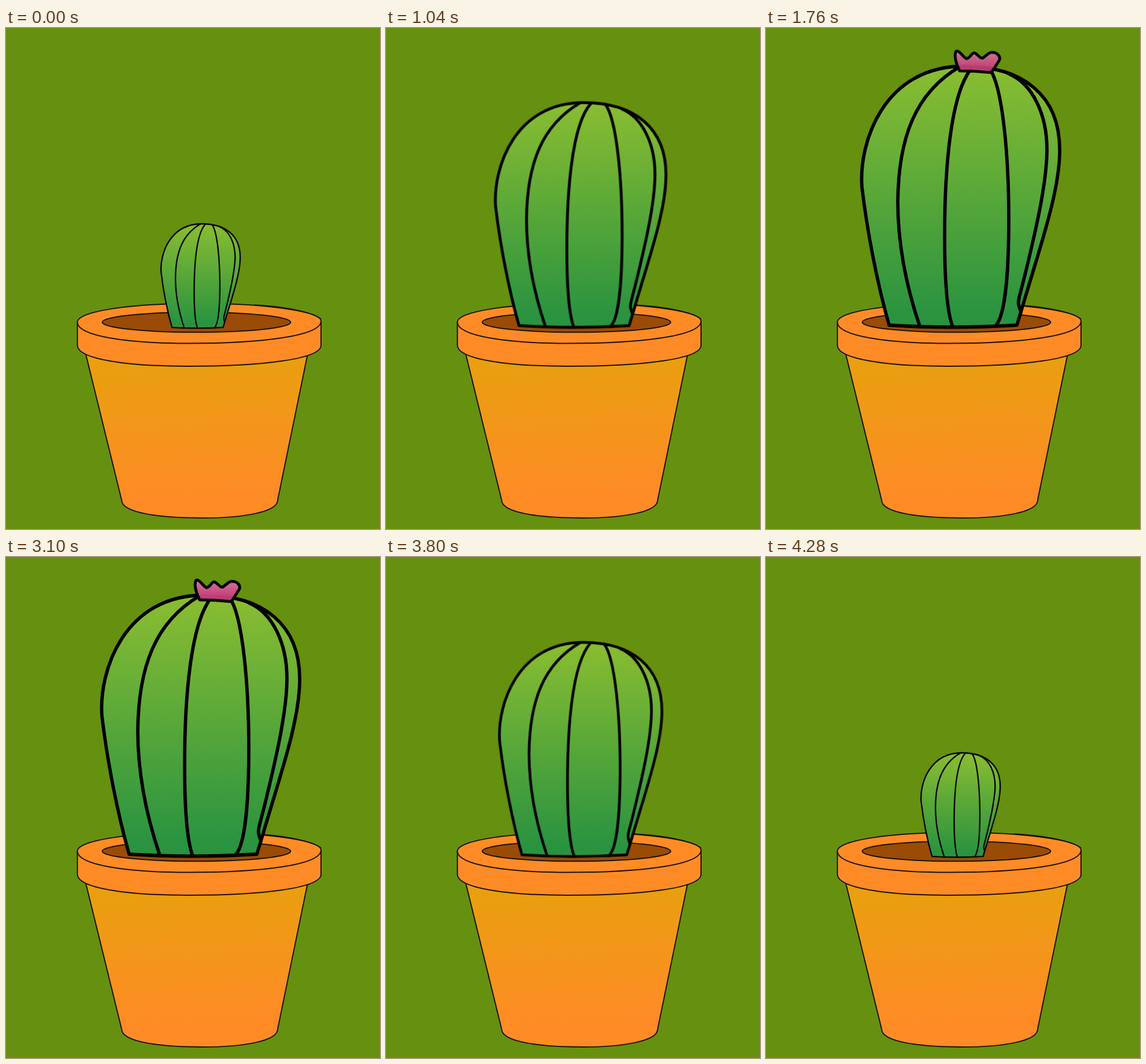
An HTML page for the animation above (5400 ms loop, 647 px wide and 865 px high).

```html
<!DOCTYPE html>
<html lang="en">
<head>
<meta charset="utf-8">
<title>Growing cactus</title>
<style>
  html, body { margin: 0; width: 100%; height: 100%; overflow: hidden; background: #66900f; }
  svg { display: block; width: 100%; height: 100%; }
  path, ellipse { stroke-linejoin: round; stroke-linecap: round; }
  .pot { stroke: #1a1204; stroke-width: 2; }
  .cactus { stroke: #000; stroke-width: 5.8; transform-origin: 336.5px 519.5px; animation: grow 5400ms infinite; }
  .flower { stroke: #000; stroke-width: 5; animation: bloom 5400ms infinite; }
  .soft { filter: blur(.6px); }

  /* 600 ms each: grow at 760, bloom at 1360, fade at 3080, shrink at 3680 */
  @keyframes grow {
    0%, 14.0741% { transform: scale(.4); animation-timing-function: ease; }
    25.1852%, 68.1481% { transform: scale(1); animation-timing-function: ease; }
    79.2593%, 100% { transform: scale(.4); }
  }
  @keyframes bloom {
    0%, 25.1852% { opacity: 0; animation-timing-function: ease; }
    36.2963%, 57.037% { opacity: 1; animation-timing-function: ease; }
    68.1481%, 100% { opacity: 0; }
  }
</style>
</head>
<body>
<svg viewBox="0 0 647 865" preserveAspectRatio="none">
  <defs>
    <linearGradient id="clay" gradientUnits="userSpaceOnUse" x1="325" y1="575" x2="335" y2="810">
      <stop offset="0" stop-color="#e99f0f"/>
      <stop offset="1" stop-color="#ff8b27"/>
    </linearGradient>
    <linearGradient id="skin" gradientUnits="userSpaceOnUse" x1="0" y1="80" x2="0" y2="495">
      <stop offset="0" stop-color="#87bc32"/>
      <stop offset="1" stop-color="#2a9340"/>
    </linearGradient>
    <linearGradient id="petal" x1="0" y1="0" x2="0" y2="1">
      <stop offset="0" stop-color="#dc74a3"/>
      <stop offset="1" stop-color="#bd2f6e"/>
    </linearGradient>
  </defs>

  <rect width="647" height="865" fill="#66900f"/>

  <g class="pot">
    <path fill="url(#clay)" d="M136 555L200 815C200 838 270 846 340 846S470 836 470 815L523.500 555Z"/>
    <path fill="#ff8b27" d="M123.500 508V548C124 572 210 584 315 584C440 584 545 572 545 548V506Z"/>
    <path fill="#ff8b27" d="M123.500 508C124 532 210 544.500 315 544.500C440 544.500 545 532 545 506C545 488 440 475.500 335 475.500C215 475.500 123.500 489 123.500 508Z"/>
    <path fill="none" stroke-width="1.400" d="M430 478Q515 483 545 502"/>
    <ellipse cx="329.500" cy="508" rx="163" ry="17.300" fill="#9a4b05"/>
  </g>

  <g class="cactus">
    <g class="soft" fill="none">
      <path fill="url(#skin)" d="M213 513C192 440 175 350 166 275C160 196 205 66 342 66C444 66 510 116 508 215C507 285 474 378 444 480L434 513Q320 520 213 513Z"/>
      <path d="M335 67C258 112 229 190 228 300C228 380 244 450 266 515"/>
      <path d="M357 68C318 112 309 250 309 360C309 440 313 490 323 516"/>
      <path d="M386 69C410 100 420 225 420 330C420 410 415 500 396 515"/>
      <path d="M420 79C462 97 486 150 486 210C486 270 464 360 450 418S433 470 441 490"/>
    </g>
  </g>

  <path class="flower" fill="url(#petal)" d="M335 74C328 61 325 46 329 40C335 38 340 50 347 53C353 52 356 43 360 43C365 43 369 53 375 52C381 48 385 42 391 42C399 42 406 48 404 55L390 77Q362 74 335 74Z"/>
</svg>
</body>
</html>
```
